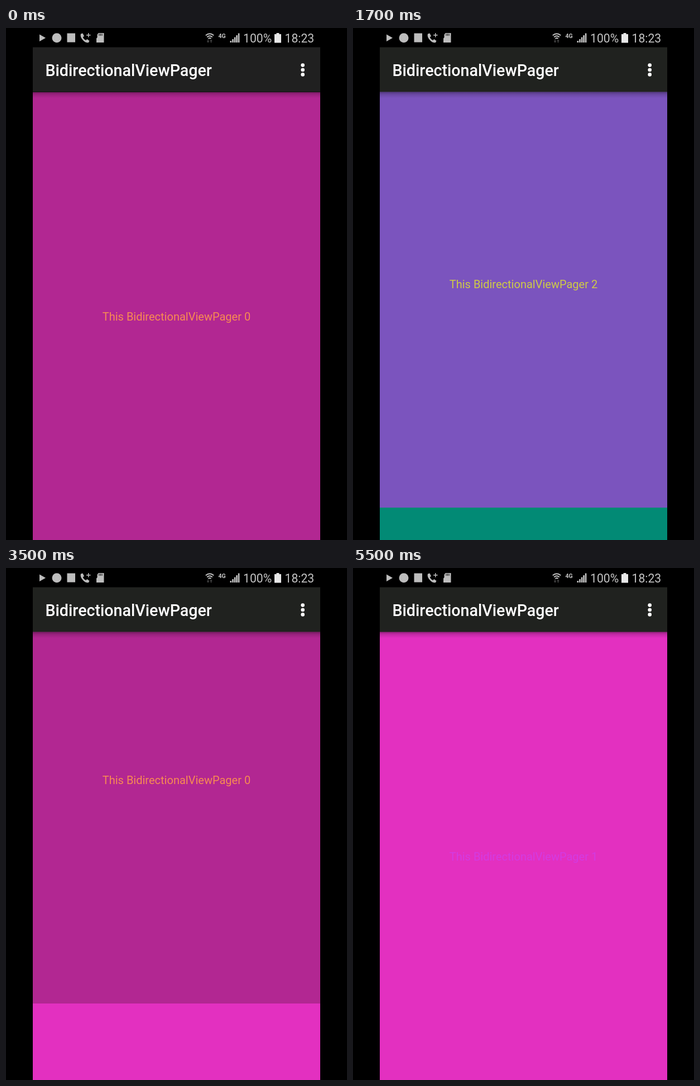
These frames come from a looping animation (611 by 917 pixels, 5600 ms). An HTML page:

```html
<!DOCTYPE html>
<html lang="en">
<head>
<meta charset="utf-8">
<title>BidirectionalViewPager</title>
<style>
  html, body { margin: 0; width: 100%; height: 100%; overflow: hidden; background: #000; }
  svg { display: block; font-family: Roboto, sans-serif; }
  .body { font-size: 20.03px; text-anchor: middle; }
  .title { font-size: 28.6px; font-weight: 500; fill: #fff; }
  .status { font-size: 21.2px; }
</style>
</head>
<body>
<svg width="611" height="917" viewBox="0 0 611 917">
  <defs>
    <linearGradient id="shade" x2="0" y2="1">
      <stop offset="0" stop-opacity=".34"/>
      <stop offset=".4" stop-opacity=".14"/>
      <stop offset="1" stop-opacity="0"/>
    </linearGradient>
  </defs>
  <g id="pages"></g>
  <rect x="48" y="114.5" width="515" height="11" fill="url(#shade)"/>
  <rect width="611" height="35"/>
  <rect id="bar" x="48" y="34.5" width="515" height="80"/>
  <text class="title" x="70.5" y="85.5">BidirectionalViewPager</text>
  <g fill="#fff">
    <circle cx="531.7" cy="66.6" r="3.3"/>
    <circle cx="531.7" cy="75" r="3.3"/>
    <circle cx="531.7" cy="83.4" r="3.3"/>
  </g>

  <g fill="#bdbdbd">
    <path d="M60 11.5 71 17.8 60 24z"/>
    <circle cx="91" cy="17.8" r="8.5"/>
    <rect x="109.5" y="9.5" width="14.5" height="16"/>
    <path d="M134 10.5 137.5 9.5 140 14.5 137.7 16.8Q139.5 20.5 143 22L145.3 20 149.5 23 148 26Q144 27.5 138.5 22.5 132 16 134 10.5z"/>
    <path d="M147.8 9v7.6M144 12.8h7.6" stroke="#bdbdbd" stroke-width="1.5"/>
    <path d="M165.5 9H175.5V26H162V18.5L163.5 17V12z"/>
    <path d="M167 10v4m2.5-4v4m2.5-4v4" stroke="#000"/>
  </g>

  <g fill="none" stroke="#c4c4c4" stroke-width="1.8">
    <path d="M357.8 13.2Q365 7.2 372.2 13.2M360.2 16.2Q365 12.3 369.8 16.2M362.5 19Q365 17 367.5 19"/>
  </g>
  <path id="download" d="M361.3 20.5h1.4v3h1.6l-2.3 3-2.3-3h1.6z"/>
  <path d="M366.8 26.5h1.4v-3h1.6l-2.3-3-2.3 3h1.6z" fill="#484848"/>
  <g fill="#c4c4c4">
    <text x="380.5" y="18" font-size="10.5" font-weight="700">4G</text>
    <path d="M401.5 23h2.6v3h-2.6zM405.2 20h2.6v6h-2.6zM408.8 16.5h2.6v9.500h-2.6zM412.300 13h2.600v13h-2.600zM415.800 9.500h2.600v16.500h-2.600z"/>
    <text class="status" x="425" y="26">100%</text>
    <path d="M484.500 9h5v2h3.500v15.500h-12V11h3.500z" fill="#e8e8e8"/>
    <text class="status" x="499.500" y="26">18:23</text>
  </g>
</svg>
<script>
const LOOP = 5600, STEP = 100, TOP = 115, HEIGHT = 802;
const $ = id => document.getElementById(id);

// background, text colour
const colors = [
  ['#b22792', '#f78b52'],
  ['#e330c0', '#d33be2'],
  ['#7b54be', '#cecb46'],
  ['#028a75', '#c9b11c'],
];
$('pages').innerHTML = colors.map(([back, ink], i) =>
  `<g><rect x="48" width="515" height="${HEIGHT + 1}" fill="${back}"/>
   <text class="body" x="305.5" y="409" fill="${ink}">This BidirectionalViewPager ${i}</text></g>`).join('');
const pages = [...$('pages').children];

// swipes: start, duration, direction
const swipes = [
  [230, 600, 1], [804.2, 700, 1], [1560, 800, 1],
  [2420, 560, -1], [2990, 340, -1], [3200, 492.6, -1],
  [4300, 1200, 1],
];

// slow drag, then a fling that settles
const ease = u => 1 - (1 - u ** 2.4) ** 4.87;
const clamp = u => Math.min(1, Math.max(0, u));
const position = t => swipes.reduce(
  (sum, [start, length, dir]) => sum + dir * ease(clamp((t - start) / length)), 0);

function draw(now) {
  const t = Math.floor(now % LOOP / STEP) * STEP;
  const p = position(t);
  pages.forEach((page, i) =>
    page.setAttribute('transform', `translate(0 ${TOP + Math.round((i - p) * HEIGHT)})`));
  $('bar').setAttribute('fill', t < 300 ? '#202020' : '#20221f');
  $('download').setAttribute('fill', t >= 1800 && t < 3400 ? '#c4c4c4' : '#484848');
  requestAnimationFrame(draw);
}
requestAnimationFrame(draw);
</script>
</body>
</html>
```
